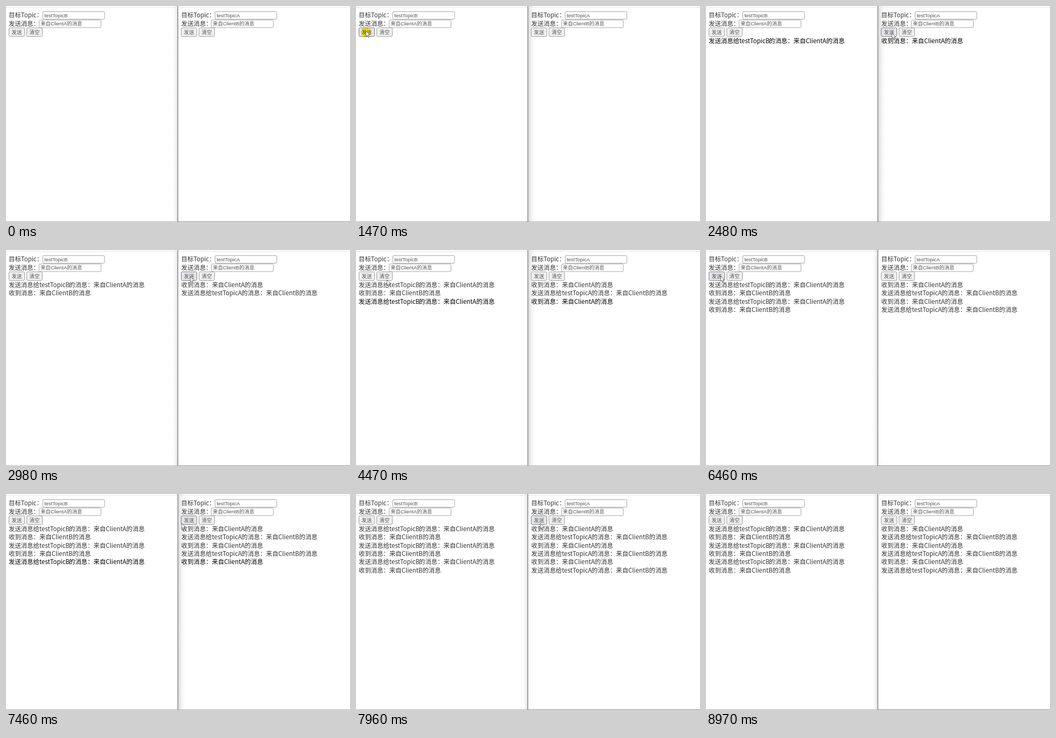
An HTML page for the animation above (9450 ms loop, 639 by 401 pixels).

```html
<!DOCTYPE html>
<html lang="zh-CN">
<head>
<meta charset="utf-8">
<title>Topic 消息</title>
<style>
  html, body { margin: 0; width: 100%; height: 100%; overflow: hidden; background: #fff; }
  svg { display: block; width: 639px; height: 401px; }
  text { font: 300 11.4px "Noto Sans CJK SC", "Noto Sans CJK", sans-serif; fill: #333; white-space: pre; }
  .ui { font: 300 9.4px "Liberation Sans", "Noto Sans CJK SC", "Noto Sans CJK", sans-serif; fill: #555; }
  .ui.mid { text-anchor: middle; }
  .fresh text { fill: #000; }
  .box { fill: #fff; stroke: #a6a6a6; }
  .btn { fill: #efefef; stroke: #a0a0a0; }
  .btn.hot { fill: #e3e5e8; stroke: #7c7c7c; }
  .click { fill: #fff000; mix-blend-mode: multiply; opacity: .85; }
</style>
</head>
<body>
<svg id="stage" viewBox="0 0 639 401" lang="zh-CN">
  <defs>
    <linearGradient id="toLeft"><stop offset="0" stop-opacity="0"/><stop offset=".5" stop-opacity=".03"/><stop offset="1" stop-opacity=".13"/></linearGradient>
    <linearGradient id="toRight"><stop offset="0" stop-opacity=".15"/><stop offset=".5" stop-opacity=".04"/><stop offset="1" stop-opacity="0"/></linearGradient>
  </defs>
</svg>
<script>
const LOOP = 9450, LEFT = 5, RIGHT = 325.5;
const stage = document.getElementById('stage');

function add(parent, tag, attrs, content) {
  const node = document.createElementNS('http://www.w3.org/2000/svg', tag);
  for (const key in attrs) node.setAttribute(key, attrs[key]);
  if (content) node.textContent = content;
  parent.appendChild(node);
  return node;
}

const rect = (x, y, width, height, attrs) => add(stage, 'rect', { x, y, width, height, ...attrs });
const label = (parent, x, y, content, cls = '') => add(parent, 'text', { x, y, class: cls }, content);
const show = (node, on) => node.setAttribute('visibility', on ? 'visible' : 'hidden');

// Window edges
const shadeLeft = rect(309, 0, 10, 400, { fill: 'url(#toLeft)' });
const shadeRight = rect(320, 0, 13, 400, { fill: 'url(#toRight)' });
rect(0, 2, 639, 1, { fill: '#e6e6e6' });
rect(0, 400, 319, 1, { fill: '#b4b4b4' });
const rightBase = rect(320, 400, 319, 1, {});
rect(318.6, 0, 1.2, 401, { fill: '#707070' });

function field(x, y, width, content) {
  rect(x, y, width, 14, { class: 'box', rx: 1.5 });
  label(stage, x + 2.7, y + 10.1, content, 'ui');
}

function button(x, content) {
  const node = rect(x, 40.5, 29, 16, { class: 'btn', rx: 2 });
  label(stage, x + 14.5, 52.3, content, 'ui mid');
  return { x, node };
}

function pane(x, topic, client) {
  const edge = Math.floor(x);
  label(stage, x, 21.1, '目标Topic：');
  field(edge + 63.5, 10.5, 114.5, topic);
  label(stage, x, 36.6, '发送消息：');
  field(edge + 56.5, 26, 115, `来自${client}的消息`);
  return [button(edge + .5, '发送'), button(edge + 33.5, '清空')];
}

const buttons = [...pane(LEFT, 'testTopicB', 'ClientA'), ...pane(RIGHT, 'testTopicA', 'ClientB')];

function sent(parent, x, y, topic, client) {
  label(parent, x, y, '发送消息给');
  label(parent, x + 57, y, topic);
  label(parent, x + 112, y, `的消息：来自${client}的消息`);
}

// The two clients take turns sending
const rows = Array.from({ length: 6 }, (_, i) => {
  const group = add(stage, 'g', {}), y = 69 + i * 15.35, fromA = i % 2 === 0;
  const client = fromA ? 'ClientA' : 'ClientB';
  sent(group, fromA ? LEFT : RIGHT, y, fromA ? 'testTopicB' : 'testTopicA', client);
  label(group, fromA ? RIGHT : LEFT, y, `收到消息：来自${client}的消息`);
  return group;
});

const click = add(stage, 'circle', { r: 9, class: 'click' });
const pointer = add(stage, 'path', {
  d: 'M.4 .5V10.4L2.7 8.3 4.4 12.2 6 11.5 4.4 7.7H7.5Z',
  fill: '#fff', stroke: '#444', 'stroke-width': .75
});

// time, active window, message count, pointer x, y, pressed
const steps = [
  [0, 'R', 0],
  [500, 'R', 0, 251, 205],
  [970, 'R', 0],
  [1470, 'L', 0, 18, 46, true],
  [1980, 'L', 1, 50, 54],
  [2480, 'L', 1, 345, 50],
  [2980, 'R', 2, 342, 49],
  [3470, 'R', 2, 14, 44],
  [3970, 'R', 2, 25, 51],
  [4470, 'L', 3, 57, 55],
  [4970, 'L', 3, 340, 50],
  [5460, 'R', 3, 343, 50, true],
  [5970, 'R', 4, 137, 56],
  [6460, 'R', 4, 27, 48],
  [6960, 'L', 5, 236, 55],
  [7460, 'L', 5, 326, 54],
  [7960, 'R', 6, 342, 54],
  [8460, 'R', 6]
];

function draw(time) {
  const [, active, count, x, y, pressed] = steps.findLast(step => step[0] <= time);
  const visible = x !== undefined, onRight = active === 'R';
  show(shadeLeft, onRight);
  show(shadeRight, !onRight);
  rightBase.setAttribute('fill', onRight ? '#8c8c8c' : '#b4b4b4');
  rows.forEach((row, i) => {
    show(row, i < count);
    row.classList.toggle('fresh', i === count - 1 && count % 2 === 1);
  });
  for (const b of buttons) {
    const hot = visible && x >= b.x && x <= b.x + 29 && y >= 40 && y < 55;
    b.node.classList.toggle('hot', hot);
  }
  show(pointer, visible);
  show(click, Boolean(pressed));
  if (visible) {
    pointer.setAttribute('transform', `translate(${x} ${y})`);
    click.setAttribute('cx', x);
    click.setAttribute('cy', y + 2.5);
  }
}

const start = performance.now();
function tick() {
  draw((performance.now() - start) % LOOP);
  requestAnimationFrame(tick);
}
tick();
</script>
</body>
</html>
```
